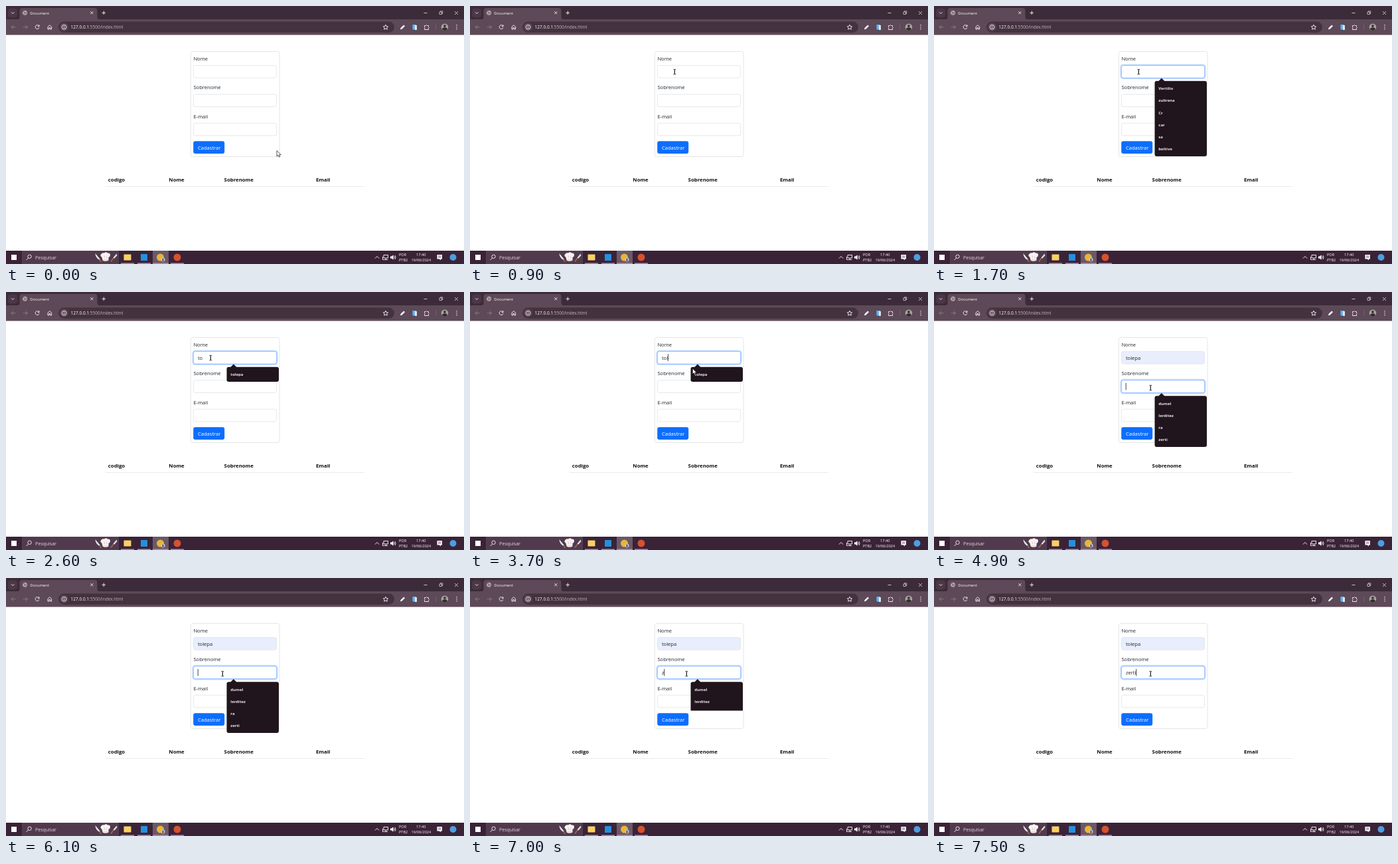
An HTML page for the animation above (8 s loop, 690 by 388 pixels).

```html
<!DOCTYPE html>
<html lang="pt-BR">
<head>
<meta charset="utf-8">
<title>Document</title>
<style>
  html, body { margin: 0; width: 100%; height: 100%; overflow: hidden; background: #fff; }
  svg { display: block; width: 690px; height: 388px; }
  text { font-family: "Open Sans", "Noto Sans", sans-serif; white-space: pre; }
  .form text { font-size: 7.6px; fill: #212529; }
  .head text { font-size: 7.8px; font-weight: 700; fill: #111; }
  .popup text { font-size: 6px; font-weight: 700; fill: #f1e6ee; }
  .line { fill: none; stroke: #eee4eb; stroke-width: 1; }
  .dim { stroke: #8d7b87; }
  .tray text { fill: #fff; font-size: 5.6px; }
</style>
</head>
<body>
<svg viewBox="0 0 690 388">
  <rect width="690" height="388" fill="#fff"/>

  <!-- browser window -->
  <rect width="690" height="22" fill="#3c2b38"/>
  <rect y="20" width="690" height="23.5" fill="#5d4957"/>
  <path d="M17 20q3.500 0 3.500-3.500V7q0-4 4-4h109q4 0 4 4v9.500q0 3.500 3.500 3.500z" fill="#5d4957"/>
  <rect x="3" y="3.500" width="14" height="14" rx="4" fill="#59465380"/>
  <g class="line">
    <path d="M8 9.300l2.200 2.200 2.200-2.200M127.300 8.200l4 4m0-4l-4 4M144.500 10.300h5.500m-2.750-2.750v5.500"/>
    <path d="M629.500 10.500h5M676 8l5 5m0-5l-5 5" stroke-width=".8"/>
    <path d="M653 9h3.500v3.500h-3.500zM654.300 9V7.800h3.500v3.500h-1.300" stroke-width=".7"/>
  </g>
  <circle cx="28.500" cy="10.300" r="3.500" fill="#b9abb5"/>
  <path d="M26 8.500q3 0 2.500 2t-2 2M31 9q-2 1-.5 3" fill="none" stroke="#5d4957" stroke-width=".9"/>
  <text x="36.300" y="12.500" font-size="5.900" fill="#fff">Document</text>

  <g class="line">
    <path class="dim" d="M14.500 31.700H8m3-3l-3 3 3 3M26 31.700h6.500m-3-3l3 3-3 3"/>
    <path d="M49.700 30a3 3 0 1 0 .3 2.500M50 28.300v2.400h-2.400"/>
    <path d="M63 31.200l2.800-2.500 2.800 2.500v3.800h-1.900v-2.500h-1.800v2.500H63z"/>
  </g>
  <rect x="79" y="23.500" width="506" height="16.500" rx="8.250" fill="#44323f"/>
  <circle cx="87.500" cy="31.700" r="6.200" fill="#5d4957"/>
  <circle class="line" cx="87.500" cy="31.700" r="3.300" stroke-width=".8"/>
  <path class="line" d="M87.500 31.200v2.200M87.500 29.500v.9"/>
  <text x="97.600" y="34.100" font-size="6.500" fill="#fff">127.0.0.1<tspan fill="#c5b7c1">:5500/index.html</tspan></text>
  <path class="line" stroke-width=".8" d="M572 28.200l1.100 2.400 2.600.3-1.900 1.700.5 2.600-2.300-1.300-2.300 1.300.5-2.600-1.900-1.700 2.600-.3z"/>
  <path d="M594 35.300l.6-2.300 4.600-4.600 1.800 1.800-4.600 4.600z" fill="#fff"/>
  <rect x="612.500" y="28" width="5.500" height="7.500" fill="#63b3ef"/>
  <path d="M616 29h3v7h-3z" fill="#d8e9f7"/>
  <path class="line" d="M630.500 29.500h2q1-2 2 0h2v2q2 1 0 2v2h-6v-2q1.500-1 0-2z"/>
  <path d="M647.500 27v9.500" stroke="#806b79" stroke-width=".6"/>
  <circle cx="661" cy="31.700" r="5.300" fill="#a9a69e"/>
  <path d="M657 35.200q0-3 4-3t4 3q-4 3.600-8 0z" fill="#332d30"/>
  <circle cx="661" cy="30" r="2" fill="#433a3b"/>
  <g fill="#f2eaf0"><circle cx="679" cy="28.700" r=".8"/><circle cx="679" cy="31.700" r=".8"/><circle cx="679" cy="34.700" r=".8"/></g>

  <!-- page -->
  <g class="form">
    <rect x="278.300" y="68.500" width="133.700" height="158" rx="3" fill="#fff" stroke="#dcdfe3" stroke-width=".8"/>
    <text x="282.400" y="81.800">Nome</text>
    <text x="282.400" y="125.300">Sobrenome</text>
    <text x="282.400" y="168.700">E-mail</text>
    <g id="fields"></g>
    <rect x="282.200" y="203.300" width="47" height="18.800" rx="3" fill="#0d6efd"/>
    <text x="288.900" y="215.600" style="fill:#fff">Cadastrar</text>
  </g>
  <g class="head">
    <text x="153.800" y="264.300">codigo</text><text x="245.300" y="264.300">Nome</text>
    <text x="328.600" y="264.300">Sobrenome</text><text x="467" y="264.300">Email</text>
  </g>
  <path d="M150 271.500h390" stroke="#dee2e6" stroke-width=".7"/>
  <g id="popup" class="popup"></g>

  <!-- taskbar -->
  <rect y="368" width="690" height="20" fill="#3a2337"/>
  <rect x="8" y="374" width="8" height="8" fill="#fff"/>
  <rect x="24.500" y="368.300" width="145" height="19.400" fill="#513a4e" stroke="#6b5267" stroke-width=".5"/>
  <circle class="line" cx="35.500" cy="376.800" r="2.700" stroke-width=".9"/>
  <path class="line" d="M33.500 379l-3 3"/>
  <text x="44" y="380.600" font-size="7" fill="#e3d8e1">Pesquisar</text>
  <path d="M134.500 372l7.500 9-1.500 1q-6-4-6-10z" fill="#e8e4e6"/><path d="M140.500 381l3 4" stroke="#a86545" stroke-width="1.600"/>
  <path d="M144.500 378q-4-3-.5-5.500 1.500-2 4-1 2.500-2.500 5 0 4-.5 4 3 0 2.500-2.500 3.500v4.500q-5 2.500-9 0z" fill="#f7f3f2"/>
  <path d="M145.500 381q4.500 2.200 9 0M148 375.500l.6 3.500M152 375.500l-.6 3.500" fill="none" stroke="#c9bcc2" stroke-width=".7"/>
  <path d="M166.500 372.500l-5 6 1.500 1.400 4.500-5z" fill="#e2dfe1"/><path d="M162 379l-4 5.500" stroke="#a86545" stroke-width="1.600"/>
  <rect x="221" y="368" width="24" height="20" fill="#6b5868"/>
  <rect x="177.500" y="373.500" width="11" height="9" rx="1" fill="#f8d164"/>
  <rect x="203" y="373" width="10" height="10" rx="1" fill="#2490dc"/>
  <circle cx="232.500" cy="378" r="5.500" fill="#e4b63a"/>
  <circle cx="236.500" cy="381.500" r="3" fill="#cdc8c4"/><path d="M234.500 383.500q2-3 4 0z" fill="#3b3034"/><circle cx="236.500" cy="380.800" r="1.100" fill="#3b3034"/>
  <circle cx="258" cy="378" r="5.500" fill="#d35230"/>
  <path d="M173 387.300h20M198 387.300h20M221 387.300h24M248 387.300h20" stroke="#dd72cf" stroke-width="1.400"/>
  <g class="tray">
    <path class="line" d="M556 379.500l3-3 3 3"/>
    <path class="line" stroke-width=".9" d="M569 374.500h6.500v4.500H569zM570 381.500h5M572.300 379v2.500M567.500 377v4.500h2"/>
    <path d="M579 376.500h2l2.500-2.300v7.600l-2.500-2.300h-2z" fill="#fff"/>
    <path class="line" stroke-width=".8" d="M584.700 376.500q1 1.500 0 3M586 375q2 3 0 6"/>
    <text x="592" y="375.600">POR</text><text x="592" y="384.300">PTB2</text>
    <text x="625.200" y="375.600" text-anchor="middle">17:40</text><text x="625.400" y="384.300" text-anchor="middle">19/06/2024</text>
    <path d="M649.500 374h7.500v6.500h-2v2l-2-2h-3.500z" fill="#fff"/>
    <path d="M651 376h4.500M651 378h4.500" stroke="#3a2337" stroke-width=".7"/>
    <circle cx="673.500" cy="378" r="5" fill="#4b9fe0"/>
  </g>

  <g id="pointer">
    <path id="arrow" d="M0 0v8.600l2-1.900 1.300 3 1.500-.6-1.300-2.900h2.700z" fill="#fff" stroke="#111" stroke-width=".7"/>
    <path id="beam" d="M-1.900-3.700h1.300q.6 0 .6.600v6.200q0 .6-.6.600h-1.300M1.900-3.700H.6q-.6 0-.6.600v6.200q0 .6.600.6h1.300" fill="none" stroke="#111" stroke-width=".8"/>
  </g>
</svg>
<script>
const LOOP = 8000;
const $ = id => document.getElementById(id);
const FIELD = { x: 282.4, w: 125.2, h: 18.7 };
const ROW = 18.2;

function add(parent, name, attrs) {
  const node = document.createElementNS("http://www.w3.org/2000/svg", name);
  for (const key in attrs) node.setAttribute(key, attrs[key]);
  return parent.appendChild(node);
}
function set(node, attrs) {
  for (const key in attrs) node.setAttribute(key, attrs[key]);
}
const show = (node, on) => set(node, { visibility: on ? "inherit" : "hidden" });

const fields = [89.4, 132.8, 176.2].map(y => {
  const g = $("fields");
  const box = { x: FIELD.x, y, width: FIELD.w, height: FIELD.h, rx: 3 };
  return {
    y,
    ring: add(g, "rect", { ...box, fill: "none", stroke: "#c2dafe", "stroke-width": 4 }),
    box: add(g, "rect", { ...box, "stroke-width": .8 }),
    text: add(g, "text", { x: 288.9, y: y + 12.1 }),
    caret: add(g, "path", { stroke: "#111", "stroke-width": .8 })
  };
});

const popup = $("popup");
const panel = add(popup, "path", { fill: "#20151d" });
const hover = add(popup, "rect", { x: 332.5, width: 78.5, height: ROW, fill: "#453640" });
const rows = Array.from({ length: 6 }, () => add(popup, "text", { x: 338.3 }));

const NAMES = ["Vertilio", "zulirena", "Cr", "car", "sa", "beltivo"];
const SURNAMES = ["dumel", "lerditez", "ra", "zerti"];

// Each entry holds from its time until the next one.
const at = (steps, t) => steps.reduce((value, [start, v]) => t >= start ? v : value, steps[0][1]);

const typed = [
  [[0, ""], [1900, "t"], [2100, "to"], [3600, "tol"], [4100, "tolepa"]],
  [[0, ""], [7000, "z"], [7100, "ze"], [7200, "zer"], [7300, "zert"], [7400, "zerti"]],
  [[0, ""]]
];
const focus = [[0, -1], [1000, 0], [4900, 1]];
const caretResets = [0, 1000, 1900, 2100, 3600, 4300, 4900, 7000, 7100, 7200, 7300, 7400];
const menus = [
  [0, null],
  [1000, { field: 0, list: NAMES }],
  [1900, { field: 0, list: NAMES.slice(0, 1), cut: true }],
  [2000, { field: 0, list: ["tolepa"] }],
  [4300, null],
  [4900, { field: 1, list: SURNAMES }],
  [7000, { field: 1, list: SURNAMES.slice(0, 2), cut: true }],
  [7100, { field: 1, list: ["zerti"] }],
  [7500, null]
];
const moves = [
  [100, 900, 408, 217.5, 308.3, 99],
  [3500, 3700, 308.3, 99, 335.3, 115],
  [3700, 4100, 335.3, 115, 350, 126.5],
  [4500, 4800, 350, 126.5, 326.3, 144]
];

function pointerAt(t) {
  let [, , x, y] = moves[0];
  for (const [from, to, x0, y0, x1, y1] of moves) {
    if (t < from) break;
    const p = Math.min(1, (t - from) / (to - from));
    const k = p * p * (3 - 2 * p);
    x = x0 + (x1 - x0) * k;
    y = y0 + (y1 - y0) * k;
  }
  return { x, y };
}

function drawMenu(menu, t) {
  show(popup, menu);
  if (!menu) return;
  const { list, cut } = menu;
  const top = fields[menu.field].y + 23.4;
  const bottom = top + ROW * list.length + (cut ? 7 : 4);
  const r = cut ? 0 : 3;
  set(panel, { d: `M335.5 ${top}H338.500L342.800 ${top - 4.300}L347.200 ${top}H408q3 0 3 3V${bottom - r}q0 ${r} ${-r} ${r}H${332.5 + r}q${-r} 0 ${-r} ${-r}V${top + 3}q0-3 3-3z` });
  set(hover, { y: top + 2 });
  show(hover, t >= 3800 && t < 4300);
  rows.forEach((row, i) => {
    row.textContent = list[i] || "";
    set(row, { y: top + 13.4 + ROW * i });
  });
}

function draw(t) {
  const focused = at(focus, t);
  const reset = caretResets.filter(s => s <= t).pop();
  const caretOn = Math.floor((t - reset) / 500) % 2 === 0 && !(t >= 4100 && t < 4300);

  fields.forEach((f, i) => {
    const active = i === focused;
    const filled = i === 0 && t >= 4100;
    f.text.textContent = at(typed[i], t);
    show(f.ring, active);
    set(f.box, { fill: filled ? "#e9eefd" : "#fff", stroke: active ? "#86b7fe" : "#dee2e6" });
    const x = 289.2 + (f.text.textContent ? f.text.getComputedTextLength() : 0);
    set(f.caret, { d: `M${x} ${f.y + 4}v10.500` });
    show(f.caret, active && caretOn);
  });

  const menu = at(menus, t);
  drawMenu(menu, t);

  const { x, y } = pointerAt(t);
  const overField = fields.some(f => x > FIELD.x && x < FIELD.x + FIELD.w && y > f.y && y < f.y + FIELD.h);
  set($("pointer"), { transform: `translate(${x} ${y})` });
  show($("beam"), overField);
  show($("arrow"), !overField);
}

const start = performance.now();
function tick() {
  const t = (performance.now() - start) % LOOP;
  draw(Math.floor(t / 100) * 100);
  requestAnimationFrame(tick);
}
tick();
</script>
</body>
</html>
```
